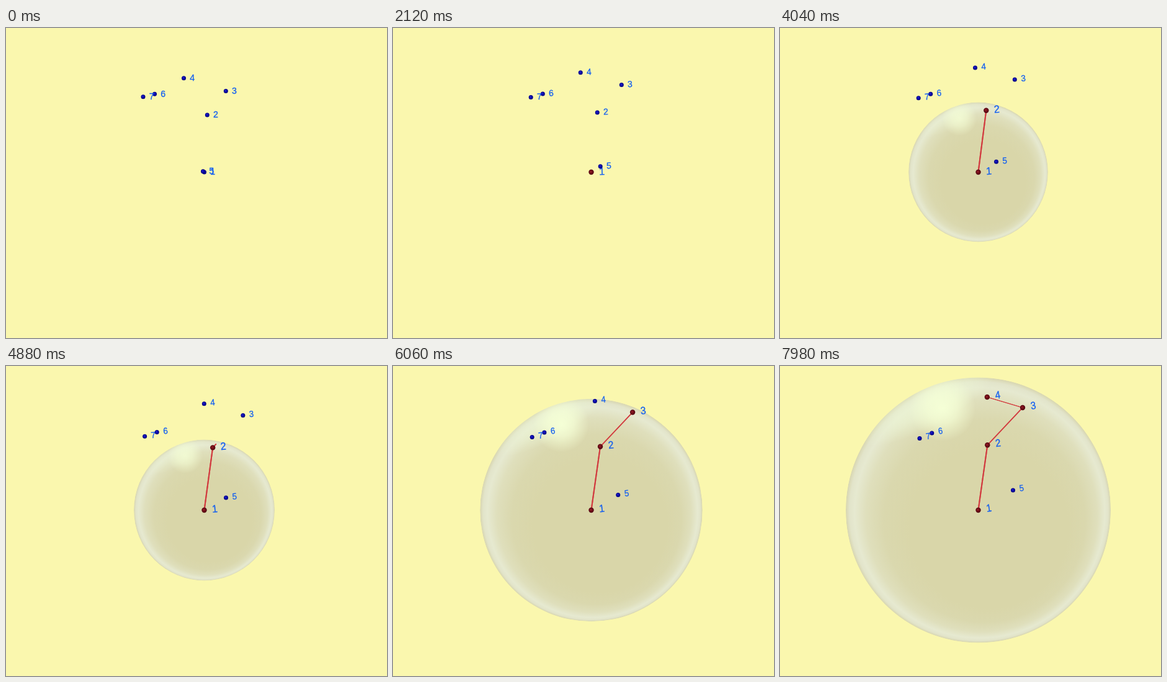
Recreate the animation shown at these times as an HTML page with a canvas. Size 614 by 499 pixels, loop 8000 ms.

```html
<!DOCTYPE html>
<html lang="en">
<head>
<meta charset="utf-8">
<title>Growing sphere through numbered points</title>
<style>
html, body { margin: 0; width: 100%; height: 100%; overflow: hidden; background: #faf7ae; }
canvas { display: block; }
</style>
</head>
<body>
<canvas id="stage" width="614" height="499"></canvas>
<script>
const ctx = document.getElementById('stage').getContext('2d');
const LOOP = 8000;
const CENTER = { x: 319.5, y: 232 };

// Each point's x and y at the start, middle and end of the loop.
const TIMES = [0, 4040, 7980];
const PATHS = [
  [[319.5, 319.5, 319.5], [232, 232, 232]],
  [[324.3, 332.3, 334.3], [140, 132.7, 127.3]],
  [[354.3, 378.3, 391], [101.5, 83, 67]],
  [[286.5, 314.5, 333.8], [80.8, 64, 50]],
  [[317.5, 348.5, 375.5], [230.8, 215.3, 200]],
  [[239.5, 242.7, 244.8], [106.3, 106.3, 108]],
  [[221, 223.2, 225], [110.7, 112.7, 116.5]]
];

// Moments when the sphere grows to reach each next point.
const GROWTHS = [
  { start: 2640, end: 4055, from: 0, to: 113.5 },
  { start: 5235, end: 6390, from: 113.5, to: 205.5 },
  { start: 7565, end: 7665, from: 205.5, to: 213.5 }
];
const FIRST_REACHED = 1640;
const LINE_TIME = 400;

const clamp01 = v => Math.max(0, Math.min(1, v));
const mix = (a, b, k) => a + (b - a) * k;

// Parabola through three values at TIMES.
function curve([a, b, c], t) {
  const [p, q, r] = TIMES;
  return a * (t - q) * (t - r) / ((p - q) * (p - r))
       + b * (t - p) * (t - r) / ((q - p) * (q - r))
       + c * (t - p) * (t - q) / ((r - p) * (r - q));
}

function sphereRadius(t) {
  return GROWTHS.reduce((sum, g) =>
    sum + (g.to - g.from) * clamp01((t - g.start) / (g.end - g.start)), 0);
}

function disc(x, y, r, fill) {
  ctx.beginPath();
  ctx.arc(x, y, r, 0, Math.PI * 2);
  ctx.fillStyle = fill;
  ctx.fill();
}

function gradient(circles, stops) {
  const g = ctx.createRadialGradient(...circles);
  stops.forEach(([at, color]) => g.addColorStop(at, color));
  return g;
}

// Soft glow in unit-sphere coordinates.
function glow(x, y, rx, ry, angle, rgb, alpha) {
  ctx.save();
  ctx.translate(x, y);
  ctx.rotate(angle);
  ctx.scale(rx, ry);
  disc(0, 0, 1, gradient([0, 0, 0, 0, 0, 1], [
    [0, `rgba(${rgb},${alpha})`],
    [0.45, `rgba(${rgb},${alpha * 0.7})`],
    [1, `rgba(${rgb},0)`]
  ]));
  ctx.restore();
}

function clipSphere(r) {
  ctx.beginPath();
  ctx.arc(CENTER.x, CENTER.y, r, 0, Math.PI * 2);
  ctx.clip();
}

function drawSphere(r) {
  if (r < 0.5) return;
  ctx.save();
  clipSphere(r);
  ctx.translate(CENTER.x, CENTER.y);
  ctx.scale(r, r);
  disc(0, 0, 1, gradient([0.08, 0.14, 0.6, 0, 0, 1], [
    [0, '#d9d6a9'],
    [0.4, '#dad8ae'],
    [0.68, '#dfdfbc'],
    [0.86, '#e6e9d0'],
    [0.94, '#e2e4ca'],
    [1, '#d8d6b0']
  ]));
  const shine = clamp01((r - 30) / 170);
  glow(-0.38, -0.8, 0.58, 0.17, -0.5, '236,246,212', shine * 0.8);
  glow(-0.27, -0.77, 0.25, 0.25, 0, '245,255,214', clamp01(shine * 1.6));
  ctx.restore();
}

// Lines are flat upright ribbons, so level ones look thinner.
function drawLines(points, t, color) {
  ctx.strokeStyle = color;
  GROWTHS.forEach((g, i) => {
    const k = clamp01((t - g.start + LINE_TIME) / LINE_TIME);
    if (!k) return;
    const a = points[i], b = points[i + 1];
    ctx.lineWidth = 0.8 + 1.2 * Math.abs(b.y - a.y) / Math.hypot(b.x - a.x, b.y - a.y);
    ctx.beginPath();
    ctx.moveTo(a.x, a.y);
    ctx.lineTo(mix(a.x, b.x, k), mix(a.y, b.y, k));
    ctx.stroke();
  });
}

function drawPoint({ x, y }, i, t) {
  const reachedAt = i === 0 ? FIRST_REACHED : GROWTHS[i - 1]?.start ?? Infinity;
  const reached = t >= reachedAt;
  const r = reached ? 4.2 : 3.5;
  const colors = reached ? ['#982028', '#740c18', '#4c0610'] : ['#2828cc', '#0808b0', '#000078'];
  disc(x, y, r, gradient([x - 1, y - 1.2, 0, x, y, r],
    colors.map((color, n) => [n / 2, color])));

  const turn = t / LOOP;
  const size = reached ? 17 : 14.2;
  ctx.save();
  ctx.translate(x + (reached ? 17 : 13.7), y - mix(0.6, 3.6, turn));
  ctx.rotate(-0.15 * turn);
  ctx.scale(mix(1, 0.9, turn), 1);
  ctx.font = `${size}px "Liberation Sans", Arial, sans-serif`;
  ctx.textAlign = 'center';
  ctx.fillStyle = ctx.strokeStyle = '#1460f0';
  ctx.lineWidth = 0.3;
  ctx.fillText(i + 1, 0, size * 0.35);
  ctx.strokeText(i + 1, 0, size * 0.35);
  ctx.restore();
}

function draw(t) {
  const points = PATHS.map(([xs, ys]) => ({ x: curve(xs, t), y: curve(ys, t) }));
  const radius = sphereRadius(t);
  ctx.fillStyle = '#faf7ae';
  ctx.fillRect(0, 0, 614, 499);
  drawSphere(radius);
  drawLines(points, t, '#e0483c');
  ctx.save();
  clipSphere(radius);
  drawLines(points, t, '#d03c42');
  ctx.restore();
  points.forEach((p, i) => drawPoint(p, i, t));
}

const began = performance.now();
function tick() {
  draw((performance.now() - began) % LOOP);
  requestAnimationFrame(tick);
}
tick();
</script>
</body>
</html>
```
